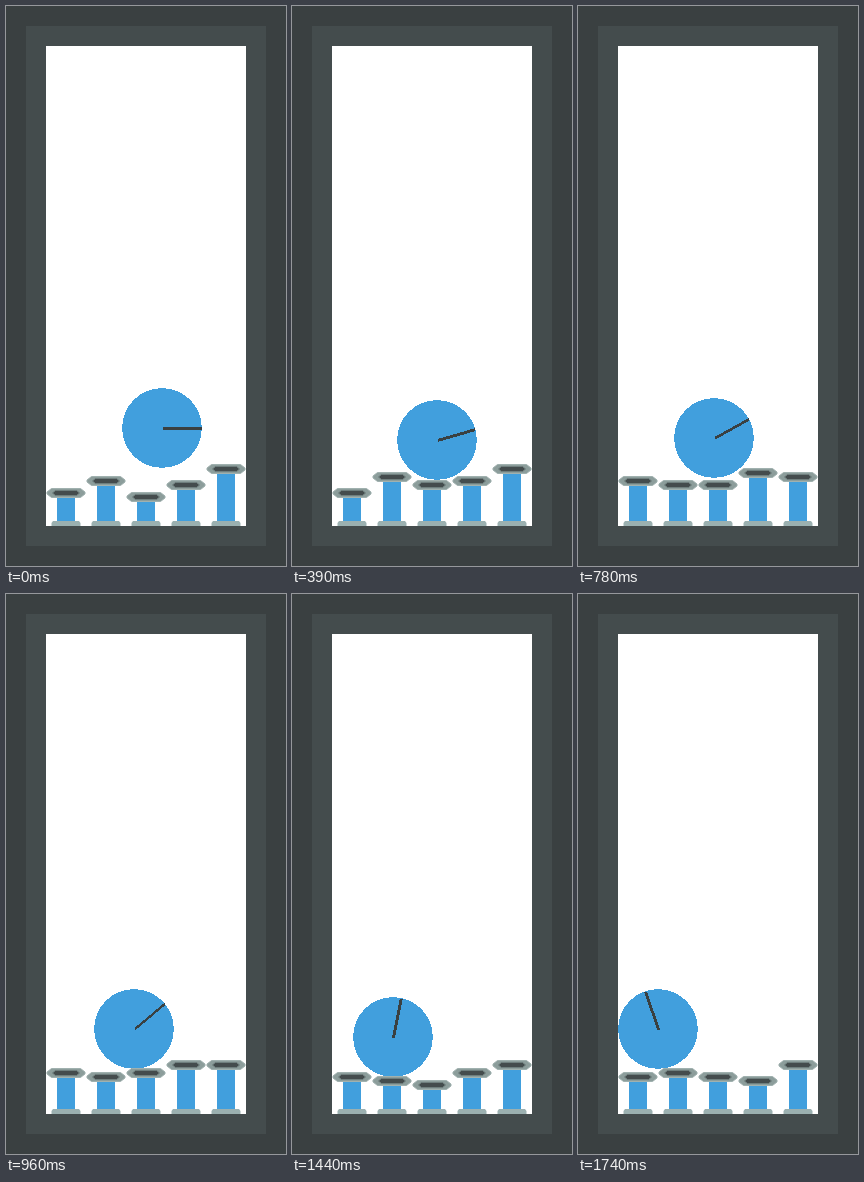
An HTML page that plays this animation: 280x560 px, repeating every 1.95 s.

```html
<!DOCTYPE html>
<html lang="en">
<head>
<meta charset="utf-8">
<title>Piston ball</title>
<style>
html, body { margin: 0; width: 100%; height: 100%; overflow: hidden; background: #3a4041; }
svg { display: block; width: 280px; height: 560px; }
</style>
</head>
<body>
<svg viewBox="0 0 280 560" shape-rendering="crispEdges">
  <rect width="280" height="560" fill="#3a4041"/>
  <rect x="20" y="20" width="240" height="520" fill="#444c4d"/>
  <rect x="40" y="40" width="200" height="480" fill="#fff"/>
  <g id="ball">
    <circle r="39.85" fill="#419fdd"/>
    <path id="spoke" fill="#3a4041"/>
  </g>
  <g id="pistons"></g>
</svg>
<script>
const STEP = 30, LAST = 1740, LOOP = 1950;
const RADIUS = 40, START_X = 156, WALL_X = 80;
const TOP = 459, NOTCH = 4, CAP_HALF = 19, CAP_RISE = 4;

// turning points of each piston: time, notches below the top
const TURNS = [
  [[0, 7], [240, 8], [780, 4], [1170, 6]],
  [[0, 4], [390, 3], [1320, 7], [1740, 5]],
  [[0, 8], [540, 4], [1170, 6], [1440, 8], [1740, 6]],
  [[0, 5.4], [780, 2], [1300, 5], [1740, 7]],
  [[0, 1], [240, 0], [780, 3]]
];

const byId = id => document.getElementById(id);
const clamp = v => Math.min(1, Math.max(0, v));
const smooth = u => u * u * (3 - 2 * u);

function add(parent, tag, attrs) {
  const el = document.createElementNS("http://www.w3.org/2000/svg", tag);
  for (const name in attrs) el.setAttribute(name, attrs[name]);
  return parent.appendChild(el);
}

function makePiston(turns, index) {
  const x = 60 + 40 * index;
  const group = add(byId("pistons"), "g", { transform: `translate(${x} 0)` });
  const rod = add(group, "rect", { x: -9, width: 18, fill: "#419fdd" });
  const soft = add(group, "g", { "shape-rendering": "auto" });
  add(soft, "path", { d: "M-14.5 520V517L-13 515H13L14.5 517V520z", fill: "#9bb0b0" });
  const cap = add(soft, "g", {});
  add(cap, "path", { d: "M-19-1L-14.5-4.5H14.5L19-1V1L14.5 4.5H-14.5L-19 1z", fill: "#8c9d9b", stroke: "#a0b1af" });
  add(cap, "path", { d: "M-13.5 0L-10.5-2.5H10.5L13.5 0L10.5 2.5H-10.5z", fill: "#444c4d", stroke: "#6f7f7e" });
  return {
    x,
    heightAt: t => TOP + NOTCH * Math.round(turns.slice(1).reduce((drop, [end, to], i) => {
      const [begin, from] = turns[i];
      return drop + (to - from) * smooth(clamp((t - begin) / (end - begin)));
    }, turns[0][1])),
    place(y) {
      rod.setAttribute("y", y + 4);
      rod.setAttribute("height", 516 - y);
      cap.setAttribute("transform", `translate(0 ${y})`);
    }
  };
}

const pistons = TURNS.map(makePiston);

// distance rolled left: a short initial push, then a speeding roll to the wall
function rolled(t) {
  const push = 13.4 * (1 - Math.exp(-t / 215));
  return push + 62.6 * clamp((t - 480) / 1260) ** 1.5;
}

// height at which the ball touches the first cap below it
function restY(x, heights) {
  return Math.min(...pistons.map((piston, i) => {
    const gap = Math.max(0, Math.abs(x - piston.x) - CAP_HALF);
    return gap < RADIUS ? heights[i] - CAP_RISE - Math.sqrt(RADIUS ** 2 - gap ** 2) : Infinity;
  }));
}

const bounce = t => 13 * Math.abs(Math.cos(Math.PI * t / 240)) * Math.exp(-t / 200);

// spoke of constant thickness across its shorter axis
function spokePath(angle) {
  const dx = 39.5 * Math.cos(angle), dy = -39.5 * Math.sin(angle);
  const steep = Math.abs(dy) > Math.abs(dx);
  const [ox, oy] = steep ? [1.5, 0] : [0, 1.5];
  const corner = (x, y) => `${(x + 0.5).toFixed(2)} ${(y + 0.5).toFixed(2)}`;
  return `M${corner(-ox, -oy)}L${corner(dx - ox, dy - oy)}L${corner(dx + ox, dy + oy)}L${corner(ox, oy)}z`;
}

function draw(ms) {
  const t = Math.min(LAST, Math.floor(ms % LOOP / STEP) * STEP);
  const heights = pistons.map(piston => piston.heightAt(t));
  const x = Math.max(WALL_X, START_X - rolled(t));
  const y = restY(x, heights) - bounce(t);
  pistons.forEach((piston, i) => piston.place(heights[i]));
  byId("ball").setAttribute("transform", `translate(${Math.round(x)} ${Math.round(y)})`);
  byId("spoke").setAttribute("d", spokePath((START_X - x) / RADIUS));
}

const start = performance.now();
function tick() {
  draw(performance.now() - start);
  requestAnimationFrame(tick);
}
tick();
</script>
</body>
</html>
```
